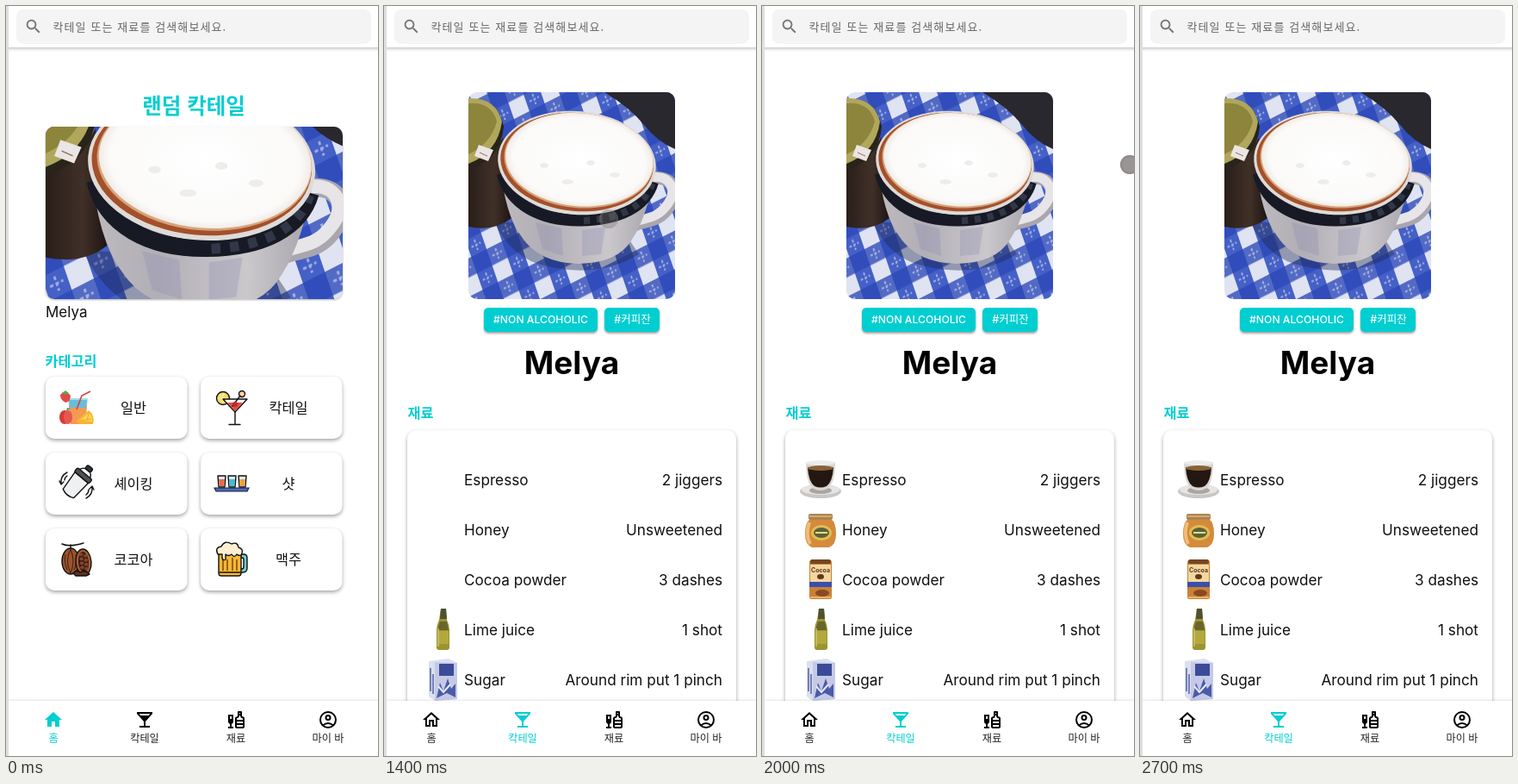
Recreate the animation shown at these times as an HTML page. Size 432 by 870 pixels, loop 3200 ms.

```html
<!DOCTYPE html>
<html lang="ko">
<head>
<meta charset="utf-8">
<title>칵테일</title>
<style>
  html, body { margin: 0; width: 100%; height: 100%; overflow: hidden; background: #fff; }
  svg { display: block; }
  text { font-family: Inter, "Noto Sans CJK KR", "Noto Sans CJK", sans-serif; }
  .ko { font-family: "Noto Sans CJK KR", "Noto Sans CJK", Inter, sans-serif; }
  .ink { stroke: #111; stroke-width: 1.4; stroke-linejoin: round; stroke-linecap: round; }
  .card { fill: #fff; filter: drop-shadow(0 2px 2px rgba(0,0,0,.36)); }
</style>
</head>
<body>
<svg id="stage" width="432" height="870" viewBox="0 0 432 870">
  <defs>
    <pattern id="cloth" width="40" height="40" patternUnits="userSpaceOnUse" patternTransform="translate(22 2) rotate(-27) skewX(-8)">
      <path fill="#dfe3f2" d="M0 0h40v40H0z"/>
      <path fill="#4560c6" d="M0 0h20v40H0z"/>
      <path fill="#2c48b8" opacity=".78" d="M0 0h40v20H0z"/>
      <path stroke="#dfe5f8" stroke-width="2" stroke-dasharray="3 2" opacity=".6" d="M30 4v12M24 10h12M10 24v12M4 30h12"/>
    </pattern>
    <linearGradient id="mug">
      <stop offset="0" stop-color="#bdbabd"/><stop offset=".3" stop-color="#b2aeb6"/>
      <stop offset=".7" stop-color="#cbc8cc"/><stop offset="1" stop-color="#a5a1aa"/>
    </linearGradient>
    <radialGradient id="foam">
      <stop offset="0" stop-color="#fff"/><stop offset=".9" stop-color="#fbfaf9"/><stop offset="1" stop-color="#f1ebe5"/>
    </radialGradient>
    <linearGradient id="jar">
      <stop offset="0" stop-color="#2a1e1a"/><stop offset=".6" stop-color="#403027"/><stop offset="1" stop-color="#1d1412"/>
    </linearGradient>
    <clipPath id="square"><rect x="98" y="100" width="240" height="240" rx="10"/></clipPath>
    <clipPath id="wide"><rect x="46" y="140" width="345" height="200" rx="10"/></clipPath>
    <g id="photo">
      <path fill="url(#cloth)" d="M0 0h240v240H0z"/>
      <path fill="#28282e" d="M158 0h82v66q-20-8-36-28T158 0z"/>
      <path fill="#20264a" opacity=".4" d="M30 150q20 44 62 52 60 14 106-14l-20-30z"/>
      <path fill="url(#jar)" d="M0 76Q30 76 40 52L46 84Q44 130 50 146 30 162 0 156z"/>
      <path fill="#29241a" d="M0 10Q34 4 41 40 38 78 0 90z"/>
      <path fill="#b0a65c" d="M0 7Q32 6 39 34 34 70 0 83z"/>
      <path fill="#8c853b" d="M0 13Q27 11 33 34 26 60 0 72z"/>
      <path fill="#e9e6e3" d="M12 61l17 6-6 13-16-6z"/>
      <path stroke="#a06660" d="M13 70l9 4"/>
      <path fill="none" stroke="#a9a6ae" stroke-width="15" d="M207 101C234 94 246 112 234 131S210 148 194 153"/>
      <path fill="none" stroke="#e7e5e7" stroke-width="11" d="M207 100C233 93 244 112 232 129S210 145 194 150"/>
      <path fill="url(#mug)" d="M37 84Q42 142 62 168 82 198 128 199 174 198 190 171 209 142 217 88z"/>
      <path fill="#8d8db0" opacity=".32" d="M78 151l30 7 2 32-24-8zM132 160l27-4-5 32-22 2z"/>
      <g fill="none">
        <path stroke="#171a24" stroke-width="14" d="M40 94C48 130 84 149 130 148.5S206 132 214 104"/>
        <path stroke="#454c62" stroke-width="8" stroke-dasharray="7 8" opacity=".6" d="M134 149C180 147 206 130 213 106"/>
      </g>
      <g transform="rotate(5 126 82)">
        <ellipse cx="126" cy="82" rx="92" ry="60" fill="#dedbd9"/>
        <ellipse cx="126" cy="81" rx="89" ry="57" fill="#a4502a"/>
        <ellipse cx="128" cy="79" rx="87" ry="55" fill="#d6a47c"/>
        <ellipse cx="128.5" cy="78" rx="86" ry="54" fill="url(#foam)"/>
      </g>
      <g fill="#efedea"><ellipse cx="88" cy="85" rx="5" ry="3"/><ellipse cx="115" cy="104" rx="7" ry="3"/><ellipse cx="142" cy="82" rx="5" ry="3"/><ellipse cx="170" cy="96" rx="6" ry="3"/></g>
    </g>
  </defs>
  <path fill="#fff" d="M0 0h432v870H0z"/>
  <g id="home"></g>
  <g id="detail"></g>
  <g id="chrome"></g>
  <g id="cursor">
    <circle r="11" fill="#777171" fill-opacity=".75"/>
    <circle r="10" fill="none" stroke="#8d8787" stroke-opacity=".7" stroke-width="2"/>
  </g>
</svg>
<script>
const LOOP = 3200, TEAL = '#00ced1';
const $ = id => document.getElementById(id);

const text = (s, x, y, size, { anchor = 'start', fill = '#111', weight = 400, gap = 0 } = {}) => {
  const ko = /[가-힣]/.test(s) && s[0] !== '#';
  return `<text class="${ko ? 'ko' : ''}" x="${x}" y="${y}" font-size="${size}" text-anchor="${anchor}"
    fill="${fill}" font-weight="${weight}" letter-spacing="${gap}">${s}</text>`;
};
const at = (x, y, body, scale = 1) => `<g transform="translate(${x} ${y}) scale(${scale})">${body}</g>`;
const path = (d, fill, extra = '') => `<path d="${d}" fill="${fill}" ${extra}/>`;
const oval = (x, y, rx, ry, fill, extra = '') =>
  `<ellipse cx="${x}" cy="${y}" rx="${rx}" ry="${ry}" fill="${fill}" ${extra}/>`;
const box = (x, y, w, h, r, fill, extra = '') =>
  `<rect x="${x}" y="${y}" width="${w}" height="${h}" rx="${r}" fill="${fill}" ${extra}/>`;
const INK = 'class="ink"';

// Category icons, 40 x 40 each
const juice =
  path('M10 9h23l-3 30H13z', '#a8dcec') + path('M11 17h21l-2.4 22H13z', '#f39a52') +
  path('M11 11h21l-1 9H12z', '#69bddb') +
  path('M20 22L26 6 36 1', 'none', 'stroke="#d6403c" stroke-width="1.6"') +
  path('M1 5q6-7 12 1 0 7-6 8-6-3-6-9z', '#e04a44') + path('M3 3l4-3 4 3-4 2z', '#5aa84c') +
  oval(6, 31, 6, 8, '#d93a36') + oval(10, 31, 5, 8, '#e75650') + path('M8 24l1-4 4 1z', '#4f9a45') +
  path('M20 35L34 23Q42 29 39 39H23z', '#f6b62f') + path('M24 35l10-9q5 4 4 10z', '#ffd55c') +
  path('M25 35l12-2M34 26l-2 9', 'none', 'stroke="#f3a51e"');

const martini =
  oval(10, 9, 7.5, 7.5, '#f8d96b', INK) + path('M10 3v12M4 9h12M6 5l8 8', 'none', 'stroke="#fff2b5"') +
  path('M10 10h28L24 25z', '#fff', INK) + path('M15 14h18l-9 10z', '#e94a3f') +
  path('M24 25v14M17 39.5h13', 'none', INK) + oval(32, 4, 3.5, 3.5, '#fbd1a0', INK) +
  path('M30 6L21 18', 'none', INK) + oval(24, 16, 3, 3, '#b82d31');

const shaker =
  `<g transform="rotate(40 20 20)">${path('M10 11h20l-2 24q-8 4-16 0z', '#eef0f1', INK)}
  ${path('M12 6q1-5 5-6h6q4 1 5 6z', '#f6f7f7', INK)}${box(9, 5, 22, 6, 2, '#4d5154', INK)}
  ${box(16, -5, 8, 5, 2, '#303436', INK)}</g>` +
  path('M2 20Q1 11 9 7M0 17l2 4 3-3M6 16q0-3 3-5M38 24q1 9-7 13M40 27l-2-4-3 3M34 27q0 4-3 6', 'none', INK);

const glass = (x, fill) =>
  path(`M${x} 11h9l-1 13h-7z`, '#dcecf2', INK) + path(`M${x + 1} 15h7l-.6 8h-5.8z`, fill);
const shots = glass(4, '#e66b4c') + glass(16, '#45bdd0') + glass(28, '#f0a13d') +
  path('M0 25h40l-2 4H2z', '#4f69b5', 'stroke="#18243f" stroke-width="1.2"');

const cocoa =
  path('M3 2q9 4 25-1M13 3v5', 'none', INK) + oval(13, 22, 10, 15, '#9a552f', INK) +
  path('M13 8q-7 14 0 28M13 8q6 14 0 28M7 14q-2 8 2 18M19 14q2 8-2 18', 'none', 'stroke="#4a2414" stroke-width="1.1"') +
  `<g transform="rotate(-5 28 23)">${oval(28, 23, 9, 15, '#a75e35', INK)}${oval(28, 23, 6, 12, '#3a1b12')}
  ${[14, 19, 24, 29].map(y => oval(26, y, 2.4, 2, '#80452c') + oval(31, y + 2, 2.4, 2, '#80452c')).join('')}</g>` +
  path('M16 36q4-5 8-1 6-4 11 2l-4 2H19z', '#5f3020', INK);

const beer =
  path('M29 14h5q4 0 4 4v12q0 5-5 5h-4v-4h3q2 0 2-3V20q0-2-2-2h-3z', '#70ccd1', INK) +
  path('M5 12h26v24q0 3-3 3H8q-3 0-3-3z', '#f8b831', INK) +
  path('M10 18v15M15 20v13M21 18v15M26 20v13', 'none', 'stroke="#754715" stroke-width="1.5"') +
  path('M4 14Q0 6 8 5q4-8 12-3 7-3 8 4 7 2 3 9-3 1-5-1-3 5-6 0-4 3-7 0v6q-3 2-4-2v-4z', '#fff0d4', INK) +
  path('M6 35h24', 'none', INK);

const cats = [['일반', juice], ['칵테일', martini], ['셰이킹', shaker], ['샷', shots], ['코코아', cocoa], ['맥주', beer]];

$('home').innerHTML =
  text('랜덤 칵테일', 218, 125, 24.5, { anchor: 'middle', fill: TEAL, weight: 900 }) +
  box(46, 140, 345, 200, 10, '#ddd', 'filter="drop-shadow(0 1px 1px rgba(0,0,0,.3))"') +
  `<g clip-path="url(#wide)">${at(46, 67.5, '<use href="#photo"/>', 1.4375)}</g>` +
  text('Melya', 46, 360.5, 17) +
  text('카테고리', 45.5, 418, 16.3, { fill: TEAL, weight: 900 }) +
  cats.map(([name, icon], i) => {
    const col = i % 2, y = 430 + 88 * (i >> 1);
    return box(46 + 180 * col, y, 164.5, 72, 10, '#fff', 'class="card"') +
      at(62 + 180 * col, y + 16, icon) +
      text(name, 148 + 180 * col, y + 42, 16.3, { anchor: 'middle' });
  }).join('');

// Ingredient pictures, centred on 0,0
const espresso =
  oval(0, 14, 24, 8, '#c9c7c5') + oval(0, 12, 22, 6, '#e7e5e3') + oval(0, 13, 13, 4, '#aaa6a2') +
  path('M-17-20h34q0 25-9 31-8 4-16 0-9-6-9-31z', '#d9d7d4') +
  path('M-15-14h30q-1 17-8 22-7 3-14 0-7-5-8-22z', '#241711') +
  oval(0, -19, 17, 3, '#eeecea') + oval(0, -13, 15, 3, '#8a6238');
const honey =
  path('M-12-12h24q6 4 6 17 0 13-8 16h-20q-8-3-8-16 0-13 6-17z', '#d58a3c') +
  path('M-13-8q-5 14 1 25', 'none', 'stroke="#f0bd75" stroke-width="4"') +
  box(-14, -18, 28, 7, 2, '#ad8450') + path('M-13-15h26', 'none', 'stroke="#d8b986" stroke-width="1.5"') +
  oval(1, 4, 12, 9, '#e3bd54') + oval(1, 4, 9, 6, '#596338') + path('M-6 4h14', 'none', 'stroke="#ead789" stroke-width="2"');
const powder =
  box(-13, -22, 26, 45, 2, '#cb8036') + box(-12, -23, 24, 5, 2, '#744523') +
  box(-12, -17, 24, 20, 0, '#f0d8a0') +
  text('Cocoa', 0, -8, 7, { anchor: 'middle', fill: '#65351d', weight: 700 }) +
  oval(0, -3, 4, 3, '#673519') + box(-13, 3, 26, 6, 0, '#384fae') +
  oval(2, 16, 8, 4, '#884a25') + path('M-12 21h24', 'none', 'stroke="#e6b465" stroke-width="2"');
const bottle =
  path('M-2-24h6l1 13q3 6 3 12v20q0 3-3 3H-4q-3 0-3-3V1q0-6 3-12z', '#9b9430') +
  path('M-2-24h6l1 12h-8z', '#4f5232') + path('M-3-9h8l2 10H-6z', '#68662c') +
  box(-6, 2, 13, 15, 0, '#b4a83d') + path('M-5-1v21', 'none', 'stroke="#c9c06a" stroke-width="1.5"');
const sugar =
  path('M-16-21L7-24 17-19V23L-9 25-16 20z', '#dcdff0') + path('M-9-20L17-19V23L-9 25z', '#c4cae6') +
  box(-4, -18, 17, 14, 0, '#3c4b99') +
  path('M-7 22L-3 4l4 10L6-1l4 12 5-6v16l-10-5z', '#4b5ba8') +
  path('M-14-13v27M-11-6v23', 'none', 'stroke="#7380b9" stroke-width="2"') +
  path('M-5 8l6 7 8-9', 'none', 'stroke="#e7eafa" stroke-width="2"');

const rows = [
  ['Espresso', '2 jiggers', espresso], ['Honey', 'Unsweetened', honey],
  ['Cocoa powder', '3 dashes', powder], ['Lime juice', '1 shot', bottle],
  ['Sugar', 'Around rim put 1 pinch', sugar]
];
const rowY = i => 549 + 58 * i;
const pics = (from, to) => rows.slice(from, to).map((r, i) => at(68, rowY(i + from), r[2])).join('');

$('detail').innerHTML =
  `<g clip-path="url(#square)">${at(98, 100, '<use href="#photo"/>')}</g>` +
  box(116, 350, 132, 28, 5, TEAL, 'filter="drop-shadow(0 2px 1px rgba(0,0,0,.35))"') +
  box(256, 350, 64, 28, 5, TEAL, 'filter="drop-shadow(0 2px 1px rgba(0,0,0,.35))"') +
  text('#NON ALCOHOLIC', 182, 368, 12.2, { anchor: 'middle', fill: '#fff', weight: 500 }) +
  text('#커피잔', 288.5, 368, 12.5, { anchor: 'middle', fill: '#fff', weight: 500 }) +
  text('Melya', 218, 427, 37, { anchor: 'middle', fill: '#000', weight: 700 }) +
  text('재료', 27.5, 478, 16.3, { fill: TEAL, weight: 900 }) +
  box(27, 492, 382, 390, 10, '#fff', 'class="card"') +
  rows.map(([name, amount], i) =>
    text(name, 93, rowY(i) + 6.5, 17.2) + text(amount, 393, rowY(i) + 6.5, 17.2, { anchor: 'end' })).join('') +
  pics(3, 5) + `<g id="late">${pics(0, 3)}</g>`;

// Header and bottom bar
const bar = 'M21 5V3H3v2l8 9v5H6v2h12v-2h-5v-5l8-9zM7.43 7 5.66 5h12.69l-1.78 2z';
const house = 'M10 20v-6h4v6h5v-8h3L12 3 2 12h3v8z';
const houseLine = 'M12 5.69l5 4.5V18h-2v-6H9v6H7v-7.81l5-4.5M12 3 2 12h3v8h6v-6h2v6h6v-8h3z';
const liquor = 'M3 14c0 1.3.84 2.4 2 2.82V20H3v2h6v-2H7v-3.18C8.16 16.4 9 15.3 9 14V6H3zm2-6h2v3H5zm15.63.54-.95-.32A1 1 0 0 1 19 7.28V3c0-.55-.45-1-1-1h-3c-.55 0-1 .45-1 1v4.28c0 .43-.28.81-.68.95l-.95.32c-.82.27-1.37 1.04-1.37 1.9V20c0 1.1.9 2 2 2h7c1.1 0 2-.9 2-2v-9.56c0-.86-.55-1.63-1.37-1.9zM16 4h1v1h-1zm-3 6.44.95-.32C15.18 9.72 16 8.57 16 7.28V7h1v.28c0 1.29.82 2.44 2.05 2.85l.95.31V12h-7zM20 20h-7v-2h7zm0-4h-7v-2h7z';
const lens = 'M15.5 14h-.79l-.28-.27C15.41 12.59 16 11.11 16 9.5 16 5.91 13.09 3 9.5 3S3 5.91 3 9.5 5.91 16 9.5 16c1.61 0 3.09-.59 4.23-1.57l.27.28v.79l5 4.99L20.49 19zm-6 0C7.01 14 5 11.99 5 9.5S7.01 5 9.5 5 14 7.01 14 9.5 11.99 14 9.5 14z';
const person = `<g fill="none" stroke="#000" stroke-width="2"><circle cx="12" cy="12" r="9"/>
  <circle cx="12" cy="9.5" r="2.5"/><path d="M6 18.5q6-5 12 0"/></g>`;
const tab = (x, name, icon, fill = '#000') =>
  at(x - 12, 816, icon.startsWith('<') ? icon : path(icon, fill)) +
  text(name, x, 854, 12.2, { anchor: 'middle', fill: fill === TEAL ? TEAL : '#222', weight: 300 });

$('chrome').innerHTML =
  box(-5, -5, 442, 53, 0, '#fff', 'filter="drop-shadow(0 1px 2px rgba(0,0,0,.3))"') +
  box(12, 4, 412, 40, 8, '#f4f4f4') +
  at(21, 13, path(lens, '#757575'), 0.9) +
  text('칵테일 또는 재료를 검색해보세요.', 54.5, 28.5, 13, { fill: '#666', gap: 1.1, weight: 500 }) +
  box(-5, 806, 442, 70, 0, '#fff', 'filter="drop-shadow(0 -1px 1px rgba(0,0,0,.1))"') +
  `<g id="navHome">${tab(55, '홈', house, TEAL)}${tab(161, '칵테일', bar)}</g>` +
  `<g id="navDetail">${tab(55, '홈', houseLine)}${tab(161, '칵테일', bar, TEAL)}</g>` +
  tab(267, '재료', liquor) + tab(374, '마이 바', person) +
  box(0, 0, 3, 870, 0, '#dedede');

const play = (id, steps) => {
  const keys = steps.map(([ms, style]) => ({ offset: ms / LOOP, easing: 'step-end', ...style }));
  keys.push({ ...keys[keys.length - 1], offset: 1 });
  $(id).animate(keys, { duration: LOOP, iterations: Infinity });
};
const OFF = { opacity: 0 }, ON = { opacity: 1 };
for (const id of ['home', 'navHome']) play(id, [[0, ON], [1400, OFF]]);
for (const id of ['detail', 'navDetail']) play(id, [[0, OFF], [1400, ON]]);
play('late', [[0, OFF], [2000, ON]]);

// Pointer: time, x, y, opacity
const trail = [
  [0, 300, 262, 0], [900, 300, 262, 1], [1000, 261, 247, 1], [1400, 261, 247, 0.5],
  [1500, 302, 233, 1], [1600, 346, 217, 1], [1700, 390, 201, 1], [1800, 423, 189, 1],
  [1900, 427, 184, 1], [2300, 415, 163, 1], [2400, 377, 105, 1], [2500, 330, 41, 1],
  [2600, 302, 4, 1], [2700, 302, 4, 0]
];
play('cursor', trail.map(([ms, x, y, opacity]) => [ms, { transform: `translate(${x}px, ${y}px)`, opacity }]));
</script>
</body>
</html>
```
